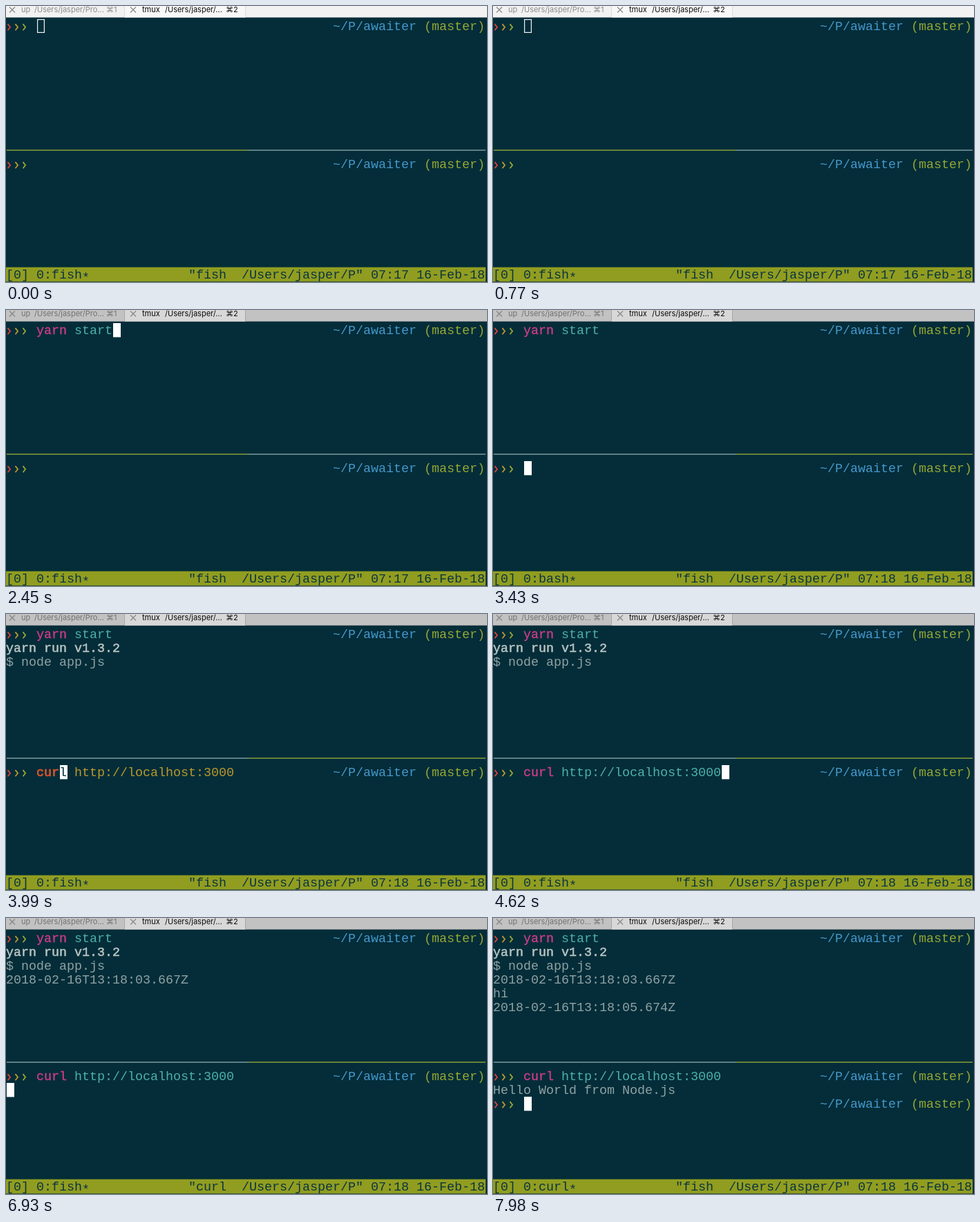
An HTML page that plays this animation: 696x400 px, repeating every 8000 ms.

```html
<!DOCTYPE html>
<html lang="en">
<head>
<meta charset="utf-8">
<title>Terminal session</title>
<style>
  html, body { margin: 0; width: 100%; height: 100%; overflow: hidden; background: #042d39; }
  svg { display: block; width: 696px; height: 400px; }
  text { white-space: pre; }
  .mono { font: 18.333px "Liberation Mono", "Noto Sans Mono", monospace; }
  .tab { font: 11px Inter, "DejaVu Sans", sans-serif; }
</style>
</head>
<body>
<svg id="stage" viewBox="0 0 696 400"></svg>
<script>
const LOOP = 8000, COL = 11, ROW = 20, TOP = 35, BOTTOM = 235;
const C = {
  bg: '#042d39', red: '#d94440', orange: '#d9552c', yellow: '#bb982c', green: '#95a833',
  blue: '#4597cb', pink: '#d03c88', teal: '#4fb0a9', grey: '#8fa2a3', pale: '#b9c6c4',
  bar: '#919d20', ink: '#0b3540', rule: '#7d9a9e', active: '#889c38'
};

// Moments of the session, in ms
const T = {
  focus: 840,
  yarn: { keys: [1260, 1400, 1610], accept: 2170, enter: 2660 },
  pane: 3220, output: 3600,
  curl: { keys: [3570, 3710, 3850], accept: 4340, enter: 5250 },
  log: 5460, reply: 7470
};

const stage = document.getElementById('stage');

const rect = (x, y, w, h, fill, extra = '') =>
  `<rect x="${x}" y="${y}" width="${w}" height="${h}" fill="${fill}" ${extra}/>`;
const line = (d, color, width) =>
  `<path d="${d}" fill="none" stroke="${color}" stroke-width="${width}"/>`;
const text = (x, y, str, color, cls, extra = '') =>
  `<text x="${x}" y="${y}" fill="${color}" class="${cls}" ${extra}>${str}</text>`;
const mono = (col, y, str, color, weight = 0) =>
  text(col * COL, y, str, color, 'mono', weight && `stroke="${color}" stroke-width="${weight}"`);

function cursor(col, y, letter = '') {
  return rect(col * COL + 1, y - 16, 11, 20.4, '#fff') + (letter && mono(col, y, letter, C.bg));
}

function hollowCursor(col, y) {
  return rect(col * COL + 1.6, y - 15.4, 9.8, 18.8, 'none', 'stroke="#eef3f3" stroke-width="1.2"');
}

function prompt(y) {
  const arrows = [C.red, C.yellow, C.green].map((color, i) =>
    line(`M${2.5 + i * COL} ${y - 8.9}l3.6 4.6l-3.6 4.6`, color, 1.8));
  return arrows.join('') + mono(43, y, '~/P/awaiter', C.blue) + mono(55, y, '(master)', C.green);
}

// A command that is typed, suggested, accepted and run
function command(t, y, name, args, when) {
  const typed = when.keys.filter(k => t >= k).length;
  if (!typed) return '';
  const argCol = 5 + name.length;
  if (t < when.accept) {
    return mono(4, y, name.slice(0, typed), C.orange, 0.7) +
      mono(5 + typed, y, name.slice(typed + 1), C.yellow) +
      mono(argCol, y, args, C.yellow) + cursor(4 + typed, y, name[typed]);
  }
  return mono(4, y, name, C.pink, 0.3) + mono(argCol, y, args, C.teal) +
    (t < when.enter ? cursor(argCol + args.length, y) : '');
}

function tab(x, title, path, pathX, key, keyX, color) {
  return line(`M${x - 4} 1.5l8 8m0-8l-8 8`, '#858585', 1.1) +
    text(x + 13, 9, title, color, 'tab') + text(pathX, 9, path, color, 'tab') +
    text(keyX, 9, key, color, 'tab');
}

function tabs(t) {
  const focused = t >= T.focus;
  const edge = focused ? '#a6a6a6' : '#dadada';
  const height = 16.6;
  return rect(0, 0, 696, height, focused ? '#c2c2c2' : '#f2f2f2') +
    rect(172, 0, 174, height, focused ? '#d8d8d8' : '#f8f8f8') +
    rect(171, 0, 1, height, edge) + rect(346, 0, 1, height, edge) +
    tab(9, 'up', '/Users/jasper/Pro...', 41, '⌘1', 145, focused ? '#727272' : '#8b8b8b') +
    tab(184, 'tmux', '/Users/jasper/...', 230, '⌘2', 318, '#0c0c0c');
}

function topPane(t) {
  let out = prompt(TOP) + command(t, TOP, 'yarn', 'start', T.yarn);
  if (t < T.focus) out += hollowCursor(4, TOP);
  else if (t < T.yarn.keys[0]) out += cursor(4, TOP);
  if (t >= T.yarn.enter && t < T.pane) out += cursor(0, TOP + ROW);
  if (t >= T.output) {
    out += mono(0, TOP + ROW, 'yarn run v1.3.2', C.pale, 0.5) +
      mono(0, TOP + 2 * ROW, '$ node app.js', C.grey);
  }
  if (t >= T.log) out += mono(0, TOP + 3 * ROW, '2018-02-16T13:18:03.667Z', C.grey);
  if (t >= T.reply) {
    out += mono(0, TOP + 4 * ROW, 'hi', C.grey) +
      mono(0, TOP + 5 * ROW, '2018-02-16T13:18:05.674Z', C.grey);
  }
  return out;
}

function bottomPane(t) {
  let out = prompt(BOTTOM) + command(t, BOTTOM, 'curl', 'http://localhost:3000', T.curl);
  if (t >= T.pane && t < T.curl.keys[0]) out += cursor(4, BOTTOM);
  if (t >= T.reply) {
    out += mono(0, BOTTOM + ROW, 'Hello World from Node.js', C.grey) +
      prompt(BOTTOM + 2 * ROW) + cursor(4, BOTTOM + 2 * ROW);
  } else if (t >= T.curl.enter) {
    out += cursor(0, BOTTOM + ROW);
  }
  return out;
}

function divider(t) {
  const [left, right] = t < T.pane ? [C.active, C.rule] : [C.rule, C.active];
  return line('M1 209H351', left, 1.4) + line('M351 209H694', right, 1.4);
}

function status(t) {
  const name = t >= T.reply ? 'curl' : t >= T.pane && t < T.output ? 'bash' : 'fish';
  const running = t >= T.yarn.enter && t < T.pane ? 'yarn'
    : t >= T.curl.enter && t < T.reply ? 'curl' : 'fish';
  const clock = t < T.yarn.enter ? '07:17' : '07:18';
  return rect(0, 378.6, 694, 20.8, C.bar) +
    mono(0, 395, `[0] 0:${name}`, C.ink) + mono(10, 399, '*', C.ink) +
    mono(24, 395, `"${running}  /Users/jasper/P" ${clock} 16-Feb-18`, C.ink);
}

let shown = '';
function render(t) {
  const scene = rect(0, 0, 696, 400, C.bg) + tabs(t) + topPane(t) +
    divider(t) + bottomPane(t) + status(t);
  if (scene !== shown) stage.innerHTML = shown = scene;
}

const start = performance.now();
function tick() {
  render((performance.now() - start) % LOOP);
  requestAnimationFrame(tick);
}
tick();
</script>
</body>
</html>
```
